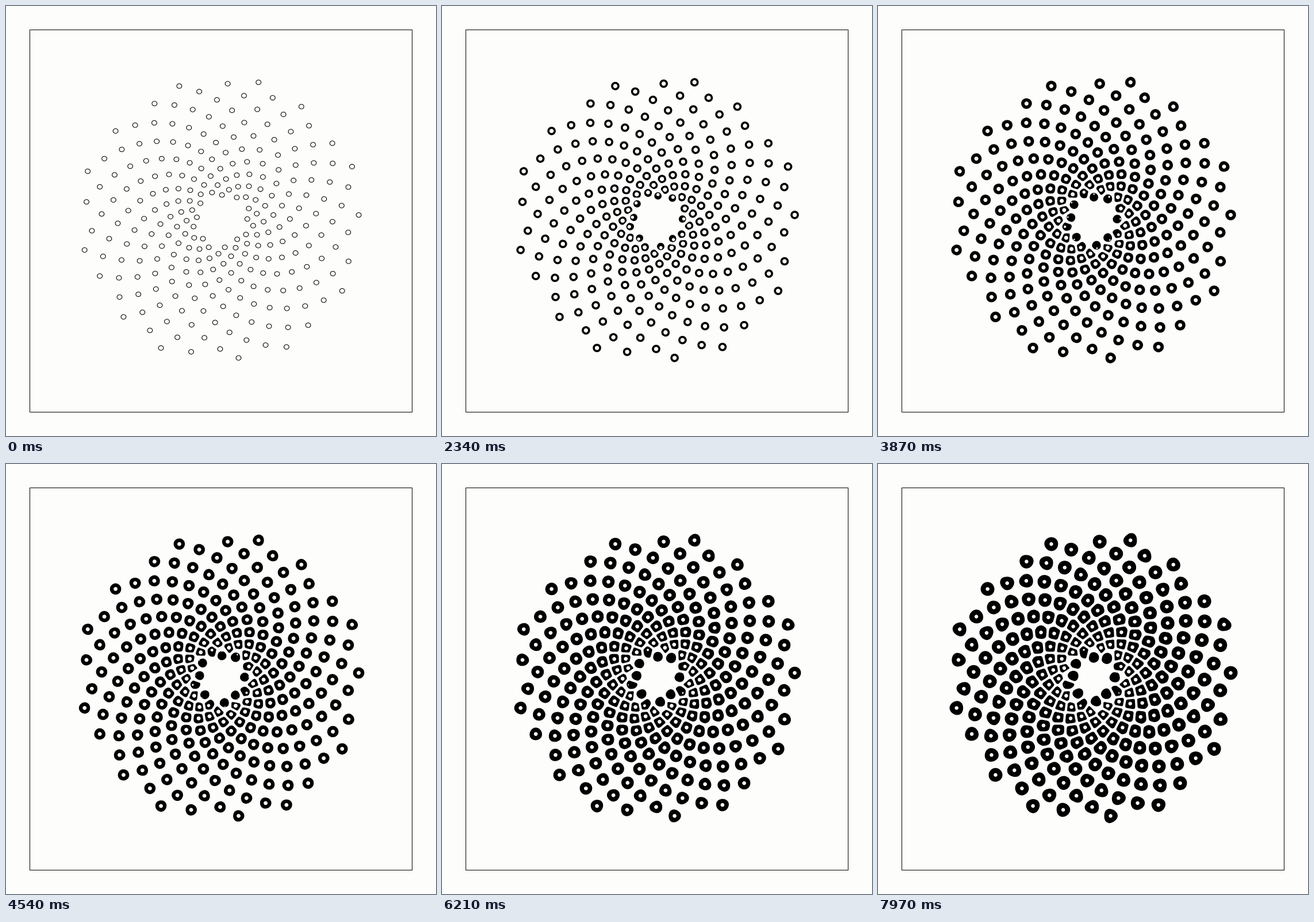
Recreate the animation shown at these times as an HTML page with a canvas. Size 748 px wide and 748 px high, loop 8000 ms.

```html
<!DOCTYPE html>
<html lang="en">
<head>
<meta charset="utf-8">
<title>Growing cells</title>
<style>
  html, body { margin: 0; width: 100%; height: 100%; overflow: hidden; background: #fdfdfc; }
  canvas { display: block; width: 748px; height: 748px; }
</style>
</head>
<body>
<canvas id="stage" width="748" height="748"></canvas>
<script>
const ctx = document.getElementById('stage').getContext('2d');
const LOOP = 8000, PAPER = '#fdfdfc', INK = '#000';
const CX = 374.1, CY = 372.8;
const GOLDEN = Math.PI * (3 - Math.sqrt(5));
const STEP = 0.832;      // spiral radius per index
const GAP = 2;           // half of the white seam between cells
const SIDES = 36, POWER = 14;

// [time, value] pairs
const RADIUS = [[0, 4.9], [1570, 6.1], [3240, 8.7], [4540, 9.8], [5470, 10.4], [7010, 11.4], [8000, 12]];
const DRIFT = [[0, 0], [1570, 0.5], [3240, 2.8], [4540, 4.8], [5470, 6], [7010, 7.2], [8000, 7.8]];
const HOLE = [[0, 3.8], [1570, 3.8], [4540, 3.4], [8000, 3.2]];

const clamp = (v, lo, hi) => Math.min(hi, Math.max(lo, v));

function sample(keys, t) {
  let i = 1;
  while (i < keys.length - 1 && t > keys[i][0]) i++;
  const [t0, v0] = keys[i - 1], [t1, v1] = keys[i];
  return v0 + (v1 - v0) * (t - t0) / (t1 - t0);
}

function seeded(seed) {
  return () => {
    seed = (seed * 16807) % 2147483647;
    return seed / 2147483647;
  };
}

const rand = seeded(4711);
const cells = [];
for (let n = 51; n < 300; n++) {
  const r = STEP * n, a = -n * GOLDEN;
  cells.push({
    r, a,
    x: CX + r * Math.cos(a),
    y: CY + r * Math.sin(a),
    rim: clamp((53 - r) / 6, 0, 1),
    phase2: rand() * 2 * Math.PI,
    phase3: rand() * 2 * Math.PI,
    bump: rand()
  });
}

for (const c of cells) {
  const reach = 2.2 * Math.sqrt(2 * Math.PI * STEP * c.r);
  c.walls = [];
  for (const o of cells) {
    const dx = o.x - c.x, dy = o.y - c.y, d = Math.hypot(dx, dy);
    if (o !== c && d < reach) c.walls.push({ ux: dx / d, uy: dy / d, dist: d / 2 - GAP });
  }
}

// Smooth minimum of the free radius and the distances to the walls
function extent(c, dx, dy, sx, sy, free) {
  let sum = free ** -POWER;
  for (const w of c.walls) {
    const cos = dx * w.ux + dy * w.uy;
    if (cos < 0.1) continue;
    const dist = Math.max(1, w.dist - sx * w.ux - sy * w.uy);
    sum += (cos / dist) ** POWER;
  }
  return sum ** (-1 / POWER);
}

function blob(x, y, squash, radiusAt, color) {
  ctx.beginPath();
  for (let i = 0; i < SIDES; i++) {
    const th = i / SIDES * 2 * Math.PI;
    const dx = Math.cos(th), dy = Math.sin(th), r = radiusAt(th, dx, dy);
    ctx.lineTo(x + r * dx, y + r * dy * squash);
  }
  ctx.closePath();
  ctx.fillStyle = color;
  ctx.fill();
}

function drawCell(c, t, size, drift, holeSize) {
  const shift = drift * c.rim;
  const ux = Math.cos(c.a), uy = Math.sin(c.a);
  const sx = -shift * ux, sy = -shift * uy;
  const wobble = 0.06 * c.bump * clamp((t - 1000) / 7000, 0, 1);
  const squash = 0.93 + 0.07 * clamp(t / 1500, 0, 1);
  const free = size - c.rim * Math.max(0, size - 4.9) * 0.4;

  blob(c.x + sx, c.y + sy, squash, (th, dx, dy) => {
    const wave = 0.5 * Math.sin(2 * th + c.phase2) + Math.sin(3 * th + c.phase3);
    return extent(c, dx, dy, sx, sy, free * (1 + wobble * wave));
  }, INK);

  // The drifting outline sweeps over the hole and closes it
  const hole = holeSize * (1 - clamp(shift / 6, 0, 1));
  if (hole < 0.4) return;
  const line = Math.min(1.1 + t / 2200, 2.2);
  const out = shift * 0.45;
  blob(c.x + out * ux, c.y + out * uy, squash, (th, dx, dy) =>
    clamp(extent(c, dx, dy, 0, 0, size) - line, 0.3, hole), PAPER);
}

function draw(t) {
  ctx.fillStyle = PAPER;
  ctx.fillRect(0, 0, 748, 748);
  ctx.strokeStyle = INK;
  ctx.lineWidth = 1;
  ctx.strokeRect(41.5, 41.5, 665, 665);
  const size = sample(RADIUS, t), drift = sample(DRIFT, t), hole = sample(HOLE, t);
  for (const c of cells) drawCell(c, t, size, drift, hole);
}

const start = performance.now();
function tick() {
  draw((performance.now() - start) % LOOP);
  requestAnimationFrame(tick);
}
tick();
</script>
</body>
</html>
```
